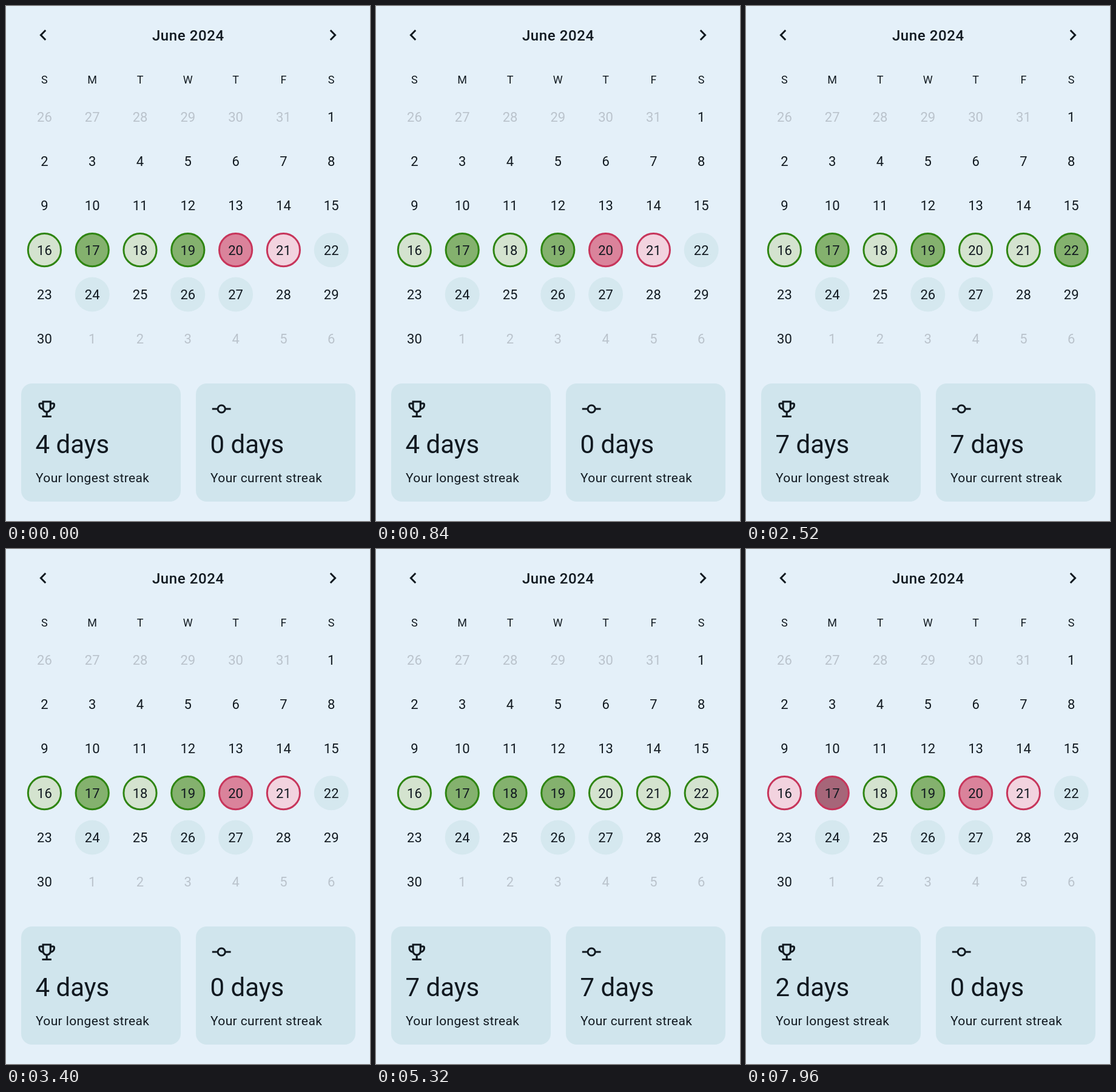
These frames come from a looping animation (600x850 px, 8000 ms). An HTML page with a canvas:

```html
<!DOCTYPE html>
<html lang="en">
<head>
<meta charset="utf-8">
<title>Streak calendar</title>
<style>
html, body { margin: 0; width: 100%; height: 100%; overflow: hidden; background: #e4f0f9; }
canvas { display: block; }
</style>
</head>
<body>
<canvas id="stage" width="600" height="850"></canvas>
<script>
const ctx = document.getElementById('stage').getContext('2d');
const LOOP = 8000;
const INK = '#111920', MUTED = '#bac3cc', BG = '#e4f0f9', CARD = '#d0e5ed';
const GREEN = '#2f8512', PINK = '#c7355b';

// Day marks: [fill, ring]
const MARKS = {
  due: ['#d5e8ef', null],
  done: ['#d4e3cf', GREEN],
  doneDue: ['#84b16e', GREEN],
  missed: ['#f2d3df', PINK],
  missedDue: ['#da839b', PINK]
};
const START = {
  16: 'done', 17: 'doneDue', 18: 'done', 19: 'doneDue', 20: 'missedDue',
  21: 'missed', 22: 'due', 24: 'due', 26: 'due', 27: 'due'
};
// Taps: [time, day, new mark, longest streak, current streak]
const TAPS = [
  [1200, 20, 'done', 5, 0],
  [1640, 21, 'done', 6, 6],
  [2080, 22, 'doneDue', 7, 7],
  [2720, 22, 'due', 6, 6],
  [2960, 21, 'missed', 5, 0],
  [3160, 20, 'missedDue', 4, 0],
  [3800, 18, 'doneDue', 4, 0],
  [4160, 20, 'done', 5, 0],
  [4500, 21, 'done', 6, 6],
  [4840, 22, 'done', 7, 7],
  [5560, 22, 'due', 6, 6],
  [5840, 21, 'missed', 5, 0],
  [6120, 20, 'missedDue', 4, 0],
  [6400, 18, 'done', 4, 0],
  [7140, 16, 'missed', 3, 0],
  [7900, 17, 'missedDue', 2, 0]
];

const TROPHY = new Path2D('M19 5h-2V3H7v2H5c-1.1 0-2 .9-2 2v1c0 2.55 1.92 4.63 4.39 4.94.63 1.5 1.98 2.63 3.61 2.96V19H7v2h10v-2h-4v-3.1c1.63-.33 2.98-1.46 3.61-2.96C19.08 12.63 21 10.55 21 8V7c0-1.1-.9-2-2-2zM5 8V7h2v3.82C5.84 10.4 5 9.3 5 8zm7 6c-1.65 0-3-1.35-3-3V5h6v6c0 1.65-1.35 3-3 3zm7-6c0 1.3-.84 2.4-2 2.82V7h2v1z');

const clamp = v => Math.max(0, Math.min(1, v));
const colX = c => 63.4 + 78.8 * c;
const rowY = r => 183 + 73.3 * r;

function text(str, x, y, size, { color = INK, weight = 400, align = 'center', spacing = 0 } = {}) {
  ctx.font = `${weight} ${size}px Roboto, sans-serif`;
  ctx.letterSpacing = spacing + 'px';
  ctx.textAlign = align;
  ctx.fillStyle = color;
  ctx.fillText(str, x, y);
}

function line(...pts) {
  ctx.beginPath();
  pts.forEach(([x, y]) => ctx.lineTo(x, y));
  ctx.stroke();
}

function disc(x, y, r, fill) {
  ctx.beginPath();
  ctx.arc(x, y, r, 0, 2 * Math.PI);
  ctx.fillStyle = fill;
  ctx.fill();
}

function ring(x, y, r, color) {
  ctx.beginPath();
  ctx.arc(x, y, r, 0, 2 * Math.PI);
  ctx.strokeStyle = color;
  ctx.lineWidth = 3;
  ctx.stroke();
}

function stateAt(t) {
  const state = { marks: { ...START }, longest: 4, current: 0, press: {} };
  for (const [at, day, mark, longest, current] of TAPS) {
    const dt = t - at;
    if (dt > -120 && dt < 200) {
      const grow = clamp((dt + 120) / 120);
      const fade = 1 - clamp((dt - 60) / 140);
      state.press[day] = { size: grow, alpha: 0.26 * grow * fade };
    }
    if (dt >= 0) {
      state.marks[day] = mark;
      Object.assign(state, { longest, current });
    }
  }
  return state;
}

function drawHeader() {
  text('June 2024', 300.3, 56.5, 24, { weight: 500, spacing: 0.6 });
  ctx.strokeStyle = INK;
  ctx.lineWidth = 3;
  line([65.2, 40], [57.4, 48], [65.2, 56]);
  line([534.8, 40], [542.6, 48], [534.8, 56]);
  [...'SMTWTFS'].forEach((d, c) => text(d, colX(c), 128, 18));
}

function drawDay(i, { marks, press }) {
  const x = colX(i % 7), y = rowY(Math.floor(i / 7));
  const n = i - 5;
  const inMonth = n >= 1 && n <= 30;
  const label = n < 1 ? n + 31 : inMonth ? n : n - 30;
  if (inMonth && marks[n]) {
    const [fill, edge] = MARKS[marks[n]];
    disc(x, y - 0.2, edge ? 27.5 : 28.5, fill);
    if (press[n]) {
      disc(x, y - 0.2, 27.5 * press[n].size, `rgba(16, 20, 26, ${press[n].alpha})`);
    }
    if (edge) ring(x, y - 0.2, 27.1, edge);
  }
  text(label, x, y + 7.6, 22, { color: inMonth ? INK : MUTED });
}

function drawCard(x, days, caption) {
  ctx.beginPath();
  ctx.roundRect(x, 623, 263, 195, 18);
  ctx.fillStyle = CARD;
  ctx.fill();
  text(days + ' days', x + 23.5, 738, 42, { align: 'left' });
  text(caption, x + 24, 786, 21, { align: 'left', spacing: 0.375 });
}

function drawIcons() {
  ctx.save();
  ctx.translate(67.2 - 12 * 1.53, 665.2 - 12 * 1.53);
  ctx.scale(1.53, 1.53);
  ctx.fillStyle = INK;
  ctx.fill(TROPHY);
  ctx.restore();
  ring(355.2, 665, 6.1, INK);
  line([339.8, 665], [349, 665]);
  line([361.4, 665], [370.6, 665]);
}

function draw(t) {
  const state = stateAt(t);
  ctx.fillStyle = BG;
  ctx.fillRect(0, 0, 600, 850);
  drawHeader();
  for (let i = 0; i < 42; i++) drawDay(i, state);
  drawCard(25, state.longest, 'Your longest streak');
  drawCard(313, state.current, 'Your current streak');
  drawIcons();
}

const begin = performance.now();
function frame() {
  draw((performance.now() - begin) % LOOP);
  requestAnimationFrame(frame);
}
frame();
</script>
</body>
</html>
```
